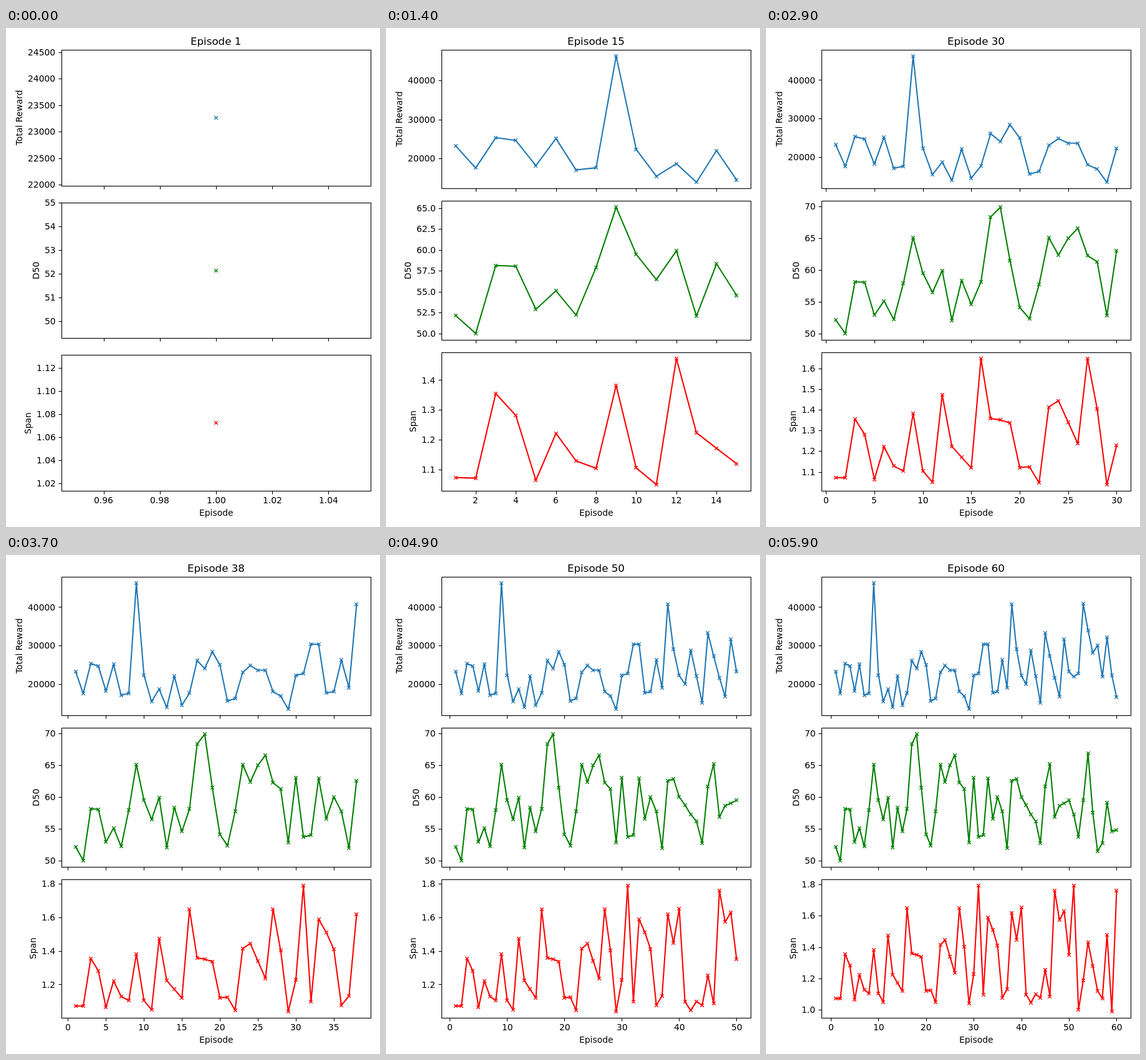
These frames come from a looping animation (600x800 px, 6 s). An HTML page with a canvas:

```html
<!DOCTYPE html>
<html lang="en">
<head>
<meta charset="utf-8">
<title>Episode charts</title>
<style>
  html, body { margin: 0; width: 100%; height: 100%; overflow: hidden; background: #fff; }
  canvas { display: block; width: 600px; height: 800px; }
</style>
</head>
<body>
<canvas id="stage" width="600" height="800"></canvas>
<script>
const ctx = document.getElementById('stage').getContext('2d');

const reward = [
  23262, 17600, 25350, 24640, 18200, 25150, 17100, 17650, 46200, 22350,
  15480, 18700, 13950, 22050, 14550, 17700, 26100, 24050, 28400, 25000,
  15600, 16280, 23050, 24800, 23640, 23600, 18050, 16900, 13480, 22250,
  22750, 30350, 30350, 17700, 18050, 26250, 19050, 40700, 29000, 22200,
  20000, 28820, 22050, 15150, 33200, 27280, 21700, 16770, 31600, 23160,
  21950, 22750, 40800, 34000, 28100, 30050, 21950, 32130, 22250, 16600];

const d50 = [
  52.14, 50, 58.13, 58.03, 52.88, 55.1, 52.18, 57.92, 65.1, 59.47,
  56.44, 59.88, 52.07, 58.33, 54.55, 58.1, 68.3, 69.84, 61.44, 54.08,
  52.32, 57.7, 65.07, 62.33, 64.95, 66.55, 62.23, 61.25, 52.81, 63,
  53.7, 53.95, 62.92, 56.54, 59.97, 57.7, 51.92, 62.52, 62.82, 59.97,
  58.7, 57.23, 56.14, 52.71, 61.64, 65.17, 56.83, 58.6, 59, 59.45,
  57.2, 53.7, 59.48, 66.85, 57.5, 51.43, 52.7, 59.1, 54.57, 54.77];

const span = [
  1.0724, 1.0705, 1.355, 1.281, 1.0635, 1.221, 1.1285, 1.1035, 1.382, 1.1045,
  1.049, 1.473, 1.223, 1.1705, 1.119, 1.648, 1.358, 1.351, 1.337, 1.121,
  1.124, 1.047, 1.414, 1.444, 1.34, 1.236, 1.649, 1.403, 1.0385, 1.227,
  1.791, 1.097, 1.589, 1.511, 1.41, 1.076, 1.131, 1.619, 1.447, 1.652,
  1.097, 1.045, 1.098, 1.076, 1.255, 1.085, 1.761, 1.573, 1.629, 1.35,
  1.794, 0.999, 1.186, 1.431, 1.28, 1.12, 1.071, 1.479, 0.988, 1.761];

const rows = [
  { name: 'Total Reward', data: reward, color: '#1f77b4' },
  { name: 'D50', data: d50, color: '#008000' },
  { name: 'Span', data: span, color: '#ff0000' },
];

const STEP_MS = 100, COUNT = reward.length;
const PT = 100 / 72;
const TOP = 35, BOTTOM = 742, RIGHT = 585, PAD = 15;
const TICK = 3.5 * PT, HALF_LABEL = 6.9;
const FONT = `${10 * PT}px "DejaVu Sans", sans-serif`;
const TITLE_FONT = `${12 * PT}px "DejaVu Sans", sans-serif`;

const snap = v => Math.floor(v + 0.5) + 0.5;

// Data limits with a 5 % margin; a lone value is widened first.
function limits(values) {
  let lo = Math.min(...values), hi = Math.max(...values);
  if (lo === hi) { lo *= 0.95; hi *= 1.05; }
  const margin = (hi - lo) * 0.05;
  return [lo - margin, hi + margin];
}

// Round tick values and their labels for a range.
function makeAxis(values, bins) {
  const [lo, hi] = limits(values);
  const raw = (hi - lo) / bins;
  const scale = 10 ** Math.floor(Math.log10(raw));
  const step = scale * [1, 2, 2.5, 5, 10].find(s => s * scale >= raw * (1 - 1e-9));
  const ticks = [];
  for (let i = Math.ceil(lo / step); i * step <= hi; i++) ticks.push(i * step);
  let digits = 0;
  while (digits < 6 && ticks.some(t => Math.abs(t - t.toFixed(digits)) > step * 1e-3)) digits++;
  return { lo, hi, ticks, labels: ticks.map(t => t.toFixed(digits)) };
}

const width = text => ctx.measureText(text).width;
const place = (axis, v, from, to) => from + (v - axis.lo) / (axis.hi - axis.lo) * (to - from);
const overhang = (axis, v, edge, size) => HALF_LABEL - Math.abs(edge - v) / (axis.hi - axis.lo) * size;

// Axes shrink so that no label leaves the padded area.
function layout(x, ys) {
  const labelW = ys.map(y => Math.max(...y.labels.map(width)));
  const left = 45 + Math.max(...labelW);
  const last = x.ticks.length - 1;
  const lastEnd = place(x, x.ticks[last], left, RIGHT) + width(x.labels[last]) / 2;
  const right = RIGHT - Math.max(0, lastEnd - RIGHT);

  let gap = 0;
  for (let i = 0; i < 2; i++) {
    const below = ys[i + 1];
    const down = Math.max(TICK, overhang(ys[i], ys[i].ticks[0], ys[i].lo, 222));
    const up = Math.max(0, overhang(below, below.ticks[below.ticks.length - 1], below.hi, 222));
    gap = Math.max(gap, PAD + down + up);
  }
  return { labelW, left, right, gap, height: (BOTTOM - TOP - 2 * gap) / 3 };
}

function line(x1, y1, x2, y2) {
  ctx.beginPath();
  ctx.moveTo(x1, y1);
  ctx.lineTo(x2, y2);
  ctx.stroke();
}

function centered(text, x, y) {
  ctx.fillText(text, Math.round(x - width(text) / 2), y);
}

function drawSeries(values, color, px, py) {
  ctx.strokeStyle = color;
  ctx.lineJoin = 'round';
  ctx.lineCap = 'square';
  ctx.lineWidth = 1.5 * PT;
  if (values.length > 1) {
    ctx.beginPath();
    values.forEach((v, i) => ctx.lineTo(px(i + 1), py(v)));
    ctx.stroke();
  }
  ctx.lineCap = 'butt';
  ctx.lineWidth = PT;
  const r = 2 * PT;
  values.forEach((v, i) => {
    const cx = Math.round(px(i + 1)), cy = Math.round(py(v));
    line(cx - r, cy - r, cx + r, cy + r);
    line(cx - r, cy + r, cx + r, cy - r);
  });
}

function drawFrame(x, y, box, px, py) {
  const l = snap(box.left), r = snap(box.right), t = snap(box.top), b = snap(box.bottom);
  ctx.strokeStyle = ctx.fillStyle = '#000';
  ctx.lineJoin = 'miter';
  ctx.lineWidth = 0.8 * PT;
  x.ticks.forEach(v => line(snap(px(v)), b, snap(px(v)), b + 5));
  y.ticks.forEach((v, i) => {
    const ty = py(v), label = y.labels[i];
    line(l, snap(ty), l - 5, snap(ty));
    ctx.fillText(label, Math.round(box.left - 2 * TICK - width(label)), Math.round(ty + 5.1));
  });
  ctx.strokeRect(l, t, r - l, b - t);
}

function drawSideLabel(text, x, y) {
  ctx.save();
  ctx.translate(Math.round(x), Math.round(y + width(text) / 2));
  ctx.rotate(-Math.PI / 2);
  ctx.fillText(text, 0, 0);
  ctx.restore();
}

function draw(n) {
  ctx.fillStyle = '#fff';
  ctx.fillRect(0, 0, 600, 800);
  ctx.font = FONT;

  const x = makeAxis(n > 1 ? [1, n] : [1], 9);
  const ys = rows.map(row => makeAxis(row.data.slice(0, n), 7));
  const { labelW, left, right, gap, height } = layout(x, ys);
  const px = v => place(x, v, left, right);

  rows.forEach((row, i) => {
    const top = TOP + i * (height + gap), bottom = top + height;
    const py = v => place(ys[i], v, bottom, top);
    drawSeries(row.data.slice(0, n), row.color, px, py);
    drawFrame(x, ys[i], { left, right, top, bottom }, px, py);
    drawSideLabel(row.name, left - 2 * TICK - labelW[i] - 4 * PT - 3.3, (top + bottom) / 2);
  });

  const mid = (left + right) / 2;
  x.ticks.forEach((v, i) => centered(x.labels[i], px(v), 762));
  centered('Episode', mid, 782);
  ctx.font = TITLE_FONT;
  centered('Episode ' + n, mid, 27);
}

const start = performance.now();
let shown = 0;
function tick() {
  const n = Math.floor(Math.max(0, performance.now() - start) / STEP_MS) % COUNT + 1;
  if (n !== shown) draw(shown = n);
  requestAnimationFrame(tick);
}
tick();
</script>
</body>
</html>
```
